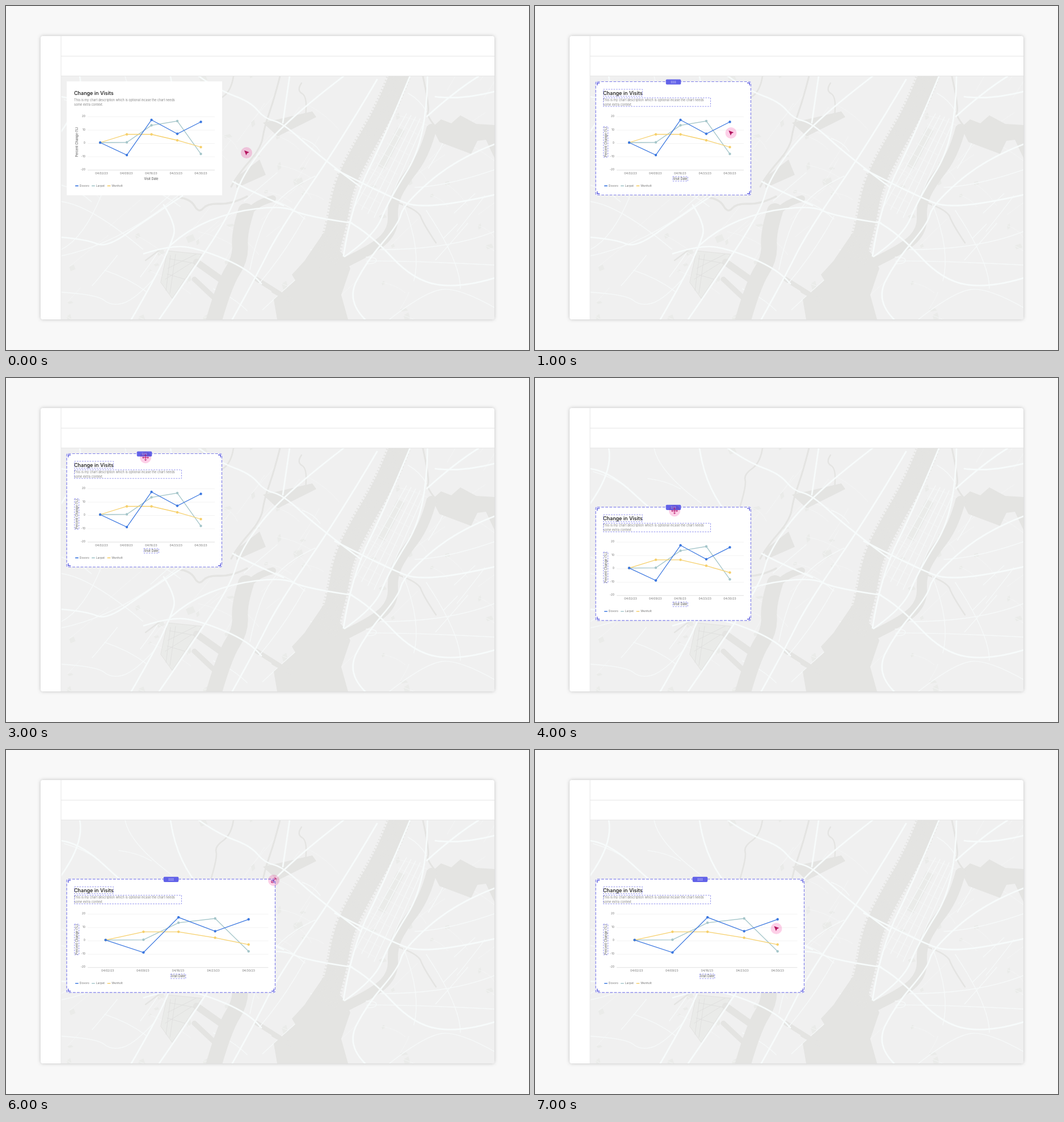
An HTML page that plays this animation: 922 px wide and 607 px high, repeating every 8000 ms.

```html
<!DOCTYPE html>
<html lang="en">
<head>
<meta charset="utf-8">
<title>Chart editing</title>
<style>
  html, body { margin: 0; width: 100%; height: 100%; overflow: hidden; background: #f8f8f8; }
  svg { display: block; width: 922px; height: 607px; font: 5px Inter, sans-serif; }
  #window { fill: #fff; filter: drop-shadow(0 0 3px rgba(0, 0, 0, .22)); }
  .rule { stroke: #e6e6e6; fill: none; }
  #map { fill: none; stroke-linejoin: round; stroke-linecap: round; }
  .water { fill: #e4e4e2; }
  .river { stroke: #e4e4e2; }
  .piers { stroke: #e4e4e2; stroke-dasharray: 2 4; stroke-linecap: butt; }
  .park { fill: #eaebe9; }
  .street { stroke: #f5f6f6; stroke-width: .8; }
  .minor { stroke: #f6f9f9; stroke-width: 1.4; }
  .major { stroke: #f7fbfb; stroke-width: 2.7; }
  .runway { stroke: #dededc; stroke-width: .8; }
  .title { font-size: 9px; font-weight: 500; fill: #111; }
  .note { font-size: 5.5px; fill: #858585; }
  .tick { fill: #707070; }
  .axis { font-size: 5.5px; font-weight: 500; fill: #666; }
  .mid { text-anchor: middle; }
  .end { text-anchor: end; }
  .frame { fill: none; stroke: #8181e9; stroke-width: 1.2; stroke-dasharray: 5 2.2; }
  .field { fill: none; stroke: #8585ec; stroke-width: .9; stroke-dasharray: 2.6 1.9; }
  .corner { fill: none; stroke: #5b5bdd; stroke-width: 1.4; }
  .halo { fill: #fdd0e8; mix-blend-mode: multiply; }
  .glyph { fill: none; stroke: #b5196c; }
  .arrow { fill: #b3165f; }
</style>
</head>
<body>
<svg viewBox="0 0 922 607">
  <clipPath id="stage"><path d="M97 124H861V549a4 4 0 0 1-4 4H97Z"/></clipPath>
  <rect id="window" x="61" y="53" width="800" height="500" rx="4"/>
  <g clip-path="url(#stage)"><path fill="#f0f0f0" d="M97 124H861V553H97Z"/><g id="map"></g></g>
  <path class="rule" d="M97 53V553M97 88.5H861M97 123.5H861"/>
  <g id="card"></g>
  <g id="cursor"></g>
</svg>
<script>
const el = id => document.getElementById(id);
const path = (kind, d, extra = '') => `<path class="${kind}" d="${d}" ${extra}/>`;

// Rounds the bends of a polyline given as "x,y x,y ..."
function smooth(text) {
  const p = text.split(' ').map(pair => pair.split(',').map(Number));
  let d = 'M' + p[0];
  for (let i = 1; i < p.length - 1; i++) {
    const next = i === p.length - 2 ? p[i + 1] : [(p[i][0] + p[i + 1][0]) / 2, (p[i][1] + p[i + 1][1]) / 2];
    d += `Q${p[i]} ${next}`;
  }
  return p.length === 2 ? d + 'L' + p[1] : d;
}
const lines = (kind, text) => text.trim().split('\n').map(row => path(kind, smooth(row.trim()))).join('');
const river = (width, text, kind = 'river') => path(kind, smooth(text), `stroke-width="${width}"`);

let seed = 11;
const random = () => (seed = seed * 16807 % 2147483647) / 2147483647;

// Small parks, and streets that follow the two main directions of the grid
function scatter() {
  let out = '';
  for (let i = 0; i < 100; i++) {
    const x = 97 + random() * 764, y = 124 + random() * 429;
    const w = 4 + random() * 9, h = 3 + random() * 8;
    if (i % 2) out += path('park', `M${x} ${y}l${w} ${-h / 2} ${w / 3} ${h} ${-w} ${h / 2}Z`);
    const angle = (random() < .6 ? -1.1 : .3) + random() * .5, length = 30 + random() * 60;
    const dx = Math.cos(angle) * length, dy = Math.sin(angle) * length;
    out += path(i % 4 ? 'street' : 'minor', `M${x} ${y}q${dx / 2 + 5} ${dy / 2 - 5} ${dx} ${dy}`);
  }
  return out;
}

function avenues() {
  let out = '';
  for (let i = 0; i < 5; i++)
    out += path('minor', `M${706 + i * 8} ${190 + i * 3}L${616 + i * 11} ${352 + i * 7}`);
  for (let i = 0; i < 9; i++)
    out += path('street', `M${692 - i * 10} ${208 + i * 17}l38 21`);
  return out;
}

const hudson = '696,115 672,178 625,258 594,320 584,385 565,450';
const waters = [
  path('water', 'M560 400L526 450 504 474 510 484 472 518 478 553H603L591 510 607 463 593 437Z'),
  path('water', 'M751 214L767 200 785 207 801 193 829 208 861 210V268L846 236 831 238 820 261 764 240Z'),
  path('water', 'M447 271L405 303 406 321 458 298ZM453 206L540 186 547 196 479 230Z'),
  river(34, hudson), river(41, hudson, 'piers'),
  river(18, '750,217 738,262 697,315 681,350 683,395 650,428 595,454'),
  river(28, '423,362 411,400 414,445 385,490 365,560'),
  river(12, '470,340 433,349 422,375'),
  river(12, '336,452 384,486'), river(9, '332,482 368,516'),
  river(8, '442,482 496,516'), river(8, '472,503 503,520'),
  river(2.6, '401,124 397,150 368,170 373,190 360,232'),
  river(3, '483,124 474,160 455,215 450,250 406,301 397,319'),
  river(3.5, '305,338 325,340 340,366 355,348 397,350 425,336'),
  river(2.4, '528,194 532,160 512,149 521,136'),
  river(3, '735,124 747,180 741,194 758,214'),
  river(2.4, '690,347 727,360 736,385 758,418'),
  river(2.4, '246,449 270,431'),
];

const westRoads = `
97,160 131,164 216,243 297,311
130,124 138,164 97,222
340,124 376,149 431,169 456,199 488,206 552,265 626,320
595,124 488,206 414,301 397,365 310,495 270,553
500,124 488,206
290,124 301,199 346,247
97,408 143,412 177,427 248,377 311,335
243,437 290,422 341,428 430,465 450,490
278,351 301,387 290,422 263,480 221,553
290,422 320,395 397,363 489,352 527,371 610,383
400,310 430,326 489,352`;

const eastRoads = `
654,130 590,239 480,399 440,479 399,553
712,124 670,226 609,350 595,441
743,124 742,235 674,344 650,405 597,442
633,553 600,520 636,450 692,385 701,350 791,271 861,244
580,288 671,335 741,361 861,333
605,381 642,402 719,485 801,498 861,480
742,195 790,151 833,124
757,160 801,166 861,151`;

const lanes = `
97,345 148,351 241,429
97,441 203,419 306,332
97,505 161,509 186,530 226,519 261,481
168,334 137,410 97,430
210,124 218,165 293,221
545,300 491,325 445,392 430,465
527,371 495,432 446,490
636,450 702,449 861,457
676,553 741,502 801,498 861,532
660,430 781,430 861,398
701,350 733,433 719,485
741,361 801,451 801,498
721,320 777,318 861,289
635,443 653,443 653,455 635,455`;

el('map').innerHTML = scatter()
  + path('park', 'M690 214L703 220 667 288 655 282Z')
  + path('park', 'M285 432L345 438 293 516 273 488Z', 'stroke="#e2e2e0"')
  + waters.join('')
  + path('runway', 'M290 440L282 502M299 438L289 507M335 438L285 463M327 453L281 482M288 446l44 8M284 473l31 9')
  + avenues() + lines('minor', lanes) + lines('major', westRoads) + lines('major', eastRoads);

const label = (kind, x, y, text, extra = '') => `<text class="${kind}" x="${x}" y="${y}" ${extra}>${text}</text>`;
const rect = (kind, x, y, w, h, extra = '') =>
  `<rect class="${kind}" x="${x}" y="${y}" width="${w}" height="${h}" ${extra}/>`;

const days = ['04/02/23', '04/09/23', '04/16/23', '04/23/23', '04/30/23'];
const series = [
  { name: 'Larpet', color: '#a5c6ca', y: [241, 240.5, 210.5, 203, 261], x: 151 },
  { name: 'Wenholt', color: '#f6d06c', y: [241, 226.5, 226.5, 237, 249], x: 178.5 },
  { name: 'Dovoro', color: '#3c78e0', y: [241, 263, 201, 225.5, 204.5], x: 122 },
];

function drawCard(width, editing) {
  const scaleX = x => 143 + (x - 143) * (width - 50) / 224;
  const right = 107 + width, middle = 107 + width / 2, axisX = scaleX(256);
  let out = rect('', 107, 133, width, 201, `fill="#fff" rx="${editing ? 2 : 0}"`)
    + label('title', 120, 156.5, 'Change in Visits')
    + label('note', 120, 168.2, 'This is my chart description which is optional incase the chart needs')
    + label('note', 120, 176, 'some extra context.');
  for (let i = 0; i < 5; i++) {
    const y = 195.5 + i * 23.5;
    out += path('', `M144 ${y}H${scaleX(368)}`, `stroke="${i < 4 ? '#f2f2f2' : '#dedede'}" stroke-width=".9"`)
      + label('tick end', 140, y + .5, 20 - i * 10)
      + label('tick mid', scaleX(168.5 + i * 43.75), 296.8, days[i]);
  }
  out += label('axis mid', axisX, 307.2, 'Visit Date')
    + label('axis mid', 0, 0, 'Percent Change (%)', 'transform="translate(127 240) rotate(-90)"');
  for (const { name, color, y, x } of series) {
    const points = [166, 213, 256.5, 302, 343.5].map((px, i) => [scaleX(px), y[i]]);
    out += path('', 'M' + points.join('L'), `fill="none" stroke="${color}" stroke-width="1.3"`)
      + points.map(([cx, cy]) => `<circle cx="${cx}" cy="${cy}" r="2.2" fill="${color}"/>`).join('')
      + rect('', x, 316.6, 5.8, 1.7, `fill="${color}" rx=".6"`)
      + label('tick', x + 7.8, 319.2, name);
  }
  if (!editing) return out;
  out += rect('frame', 107, 133.5, width - .5, 200, 'rx="2.5"')
    + rect('field', 120.5, 147, 68.8, 12.2) + rect('field', 120.5, 162, 189, 15.2)
    + rect('field', axisX - 13, 301, 26.4, 8) + rect('field', 120.7, 213, 8, 54)
    + rect('', middle - 13.3, 129.4, 26.6, 9.2, 'rx="1.8" fill="#6262e8"');
  for (const [x, sx] of [[109.7, 1], [right - 2.7, -1]])
    for (const [y, sy] of [[135.8, 1], [331.2, -1]])
      out += path('corner', `M${x} ${y + 4.2 * sy}V${y}H${x + 4.3 * sx}`);
  for (let i = 0; i < 8; i++)
    out += rect('', middle - 4.1 + i % 4 * 2.4, 132.4 + (i >> 2) * 2.4, 1.1, 1.1, 'fill="#fff"');
  return out;
}

const moveArm = path('glyph', 'M0 0V-5M-1.8 -3.4L0 -5.2 1.8 -3.4');
const glyphs = {
  arrow: path('arrow', 'M-4 -4.2L4.8 -.9 1.1 .9 -.6 4.6Z'),
  text: path('glyph', 'M-2 -4.5Q0 -4.5 0 -3V3Q0 4.5 -2 4.5M2 -4.5Q0 -4.5 0 -3M0 3Q0 4.5 2 4.5'),
  move: [0, 90, 180, 270].map(a => `<g transform="rotate(${a})">${moveArm}</g>`).join(''),
  resize: path('glyph', 'M-3.8 3.8L3.8 -3.8M.4 -4H4V-.4M-4 .4V4H-.4'),
};

// One step per second: cursor, its place, card drop, card width, editing
const steps = [
  ['arrow', 424, 259, 0, 274, false],
  ['arrow', 345.5, 224, 0, 274, true],
  ['text', 147, 153, 0, 274, true],
  ['move', 246, 140.5, 0, 274, true],
  ['move', 246, 234.5, 94.3, 274, true],
  ['resize', 379, 230, 94.3, 274, true],
  ['resize', 472, 230, 94.3, 368, true],
  ['arrow', 425.5, 315, 94.3, 368, true],
];

let shown = -1;
function tick() {
  const step = Math.floor(performance.now() % 8000 / 1000);
  if (step !== shown) {
    shown = step;
    const [kind, x, y, drop, width, editing] = steps[step];
    el('card').setAttribute('transform', `translate(0 ${drop})`);
    el('card').innerHTML = drawCard(width, editing);
    el('cursor').innerHTML = `<circle class="halo" cx="${x}" cy="${y}" r="10"/><g transform="translate(${x} ${y})">${glyphs[kind]}</g>`;
  }
  requestAnimationFrame(tick);
}
tick();
</script>
</body>
</html>
```
